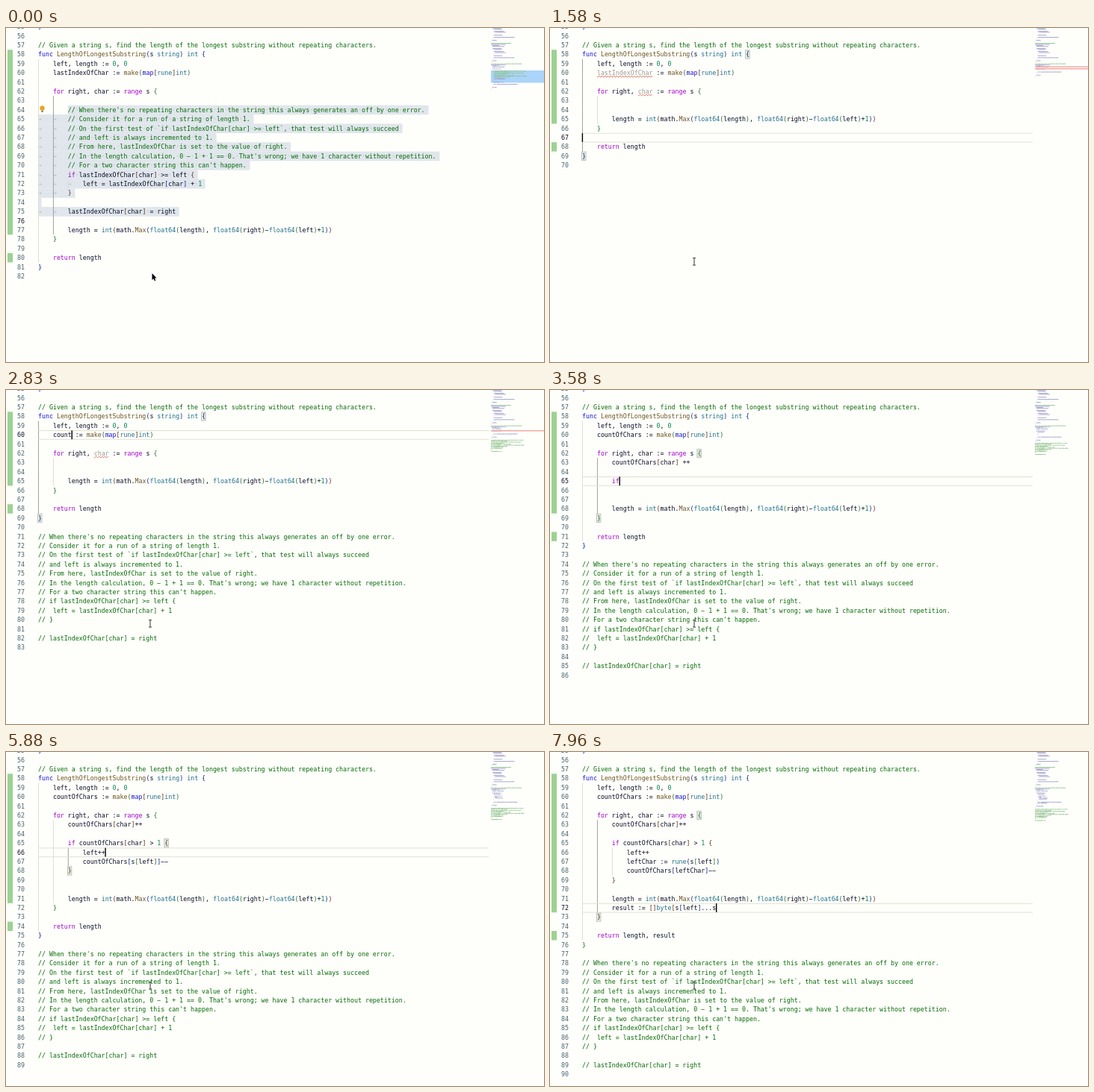
Write an HTML page with a canvas that moves like this. It is 720 px wide and 448 px high and loops after 8000 ms.

```html
<!DOCTYPE html>
<html lang="en">
<head>
<meta charset="utf-8">
<title>Code editor</title>
<style>
  html, body { margin: 0; width: 100%; height: 100%; overflow: hidden; background: #fefefb; }
  canvas { display: block; width: 720px; height: 448px; }
</style>
</head>
<body>
<canvas></canvas>
<script>
const LOOP = 8000, FIRST = 55, PITCH = 12.4, CHAR = 4.98, LEFT = 43;
const canvas = document.querySelector('canvas');
const ctx = canvas.getContext('2d');
const ratio = window.devicePixelRatio || 1;
canvas.width = 720 * ratio;
canvas.height = 448 * ratio;

const START = `}

// Given a string s, find the length of the longest substring without repeating characters.
func LengthOfLongestSubstring(s string) int {
\tleft, length := 0, 0
\tlastIndexOfChar := make(map[rune]int)

\tfor right, char := range s {

\t\t// When there's no repeating characters in the string this always generates an off by one error.
\t\t// Consider it for a run of a string of length 1.
\t\t// On the first test of \`if lastIndexOfChar[char] >= left\`, that test will always succeed
\t\t// and left is always incremented to 1.
\t\t// From here, lastIndexOfChar is set to the value of right.
\t\t// In the length calculation, 0 - 1 + 1 == 0. That's wrong; we have 1 character without repetition.
\t\t// For a two character string this can't happen.
\t\tif lastIndexOfChar[char] >= left {
\t\t\tleft = lastIndexOfChar[char] + 1
\t\t}

\t\tlastIndexOfChar[char] = right

\t\tlength = int(math.Max(float64(length), float64(right)-float64(left)+1))
\t}

\treturn length
}
`.split('\n');

// ---- Editing model: rows are line numbers, columns are character offsets ----
class Editor {
  constructor() {
    this.lines = [...START];
    this.anchor = { row: 64, col: 2 };
    this.row = 76;
    this.col = 0;
    this.focused = false;
    this.clip = '';
  }
  get(row) { return this.lines[row - FIRST] ?? ''; }
  set(row, text) { this.lines[row - FIRST] = text; }
  remove(row) { this.lines.splice(row - FIRST, 1); }
  go(row, col = this.get(row).length) { this.row = row; this.col = col; }
  range() {
    if (!this.anchor) return null;
    const here = { row: this.row, col: this.col };
    return here.row < this.anchor.row ? [here, this.anchor] : [this.anchor, here];
  }
  insert(text) {
    const line = this.get(this.row);
    const parts = (line.slice(0, this.col) + text).split('\n');
    const tail = line.slice(this.col), last = parts.length - 1;
    this.col = parts[last].length;
    parts[last] += tail;
    this.lines.splice(this.row - FIRST, 1, ...parts);
    this.row += last;
  }
  enter() { this.insert('\n' + this.get(this.row).match(/^\t*/)[0]); }
  cut() {
    const [a, b] = this.range();
    const picked = this.lines.slice(a.row - FIRST, b.row - FIRST + 1);
    const joined = this.get(a.row).slice(0, a.col) + this.get(b.row).slice(b.col);
    picked[0] = picked[0].slice(a.col);
    picked[picked.length - 1] = picked.at(-1).slice(0, b.col);
    this.clip = picked.join('\n');
    this.lines.splice(a.row - FIRST, picked.length, joined);
    this.anchor = null;
    this.go(a.row, a.col);
  }
  erase(word) {
    const at = this.get(this.row).indexOf(word);
    this.set(this.row, this.get(this.row).replace(word, ''));
    this.col = at;
  }
  eachRow(from, to, change) {
    for (let r = from; r <= to; r++) this.set(r, change(this.get(r)));
  }
}

// ---- Timeline ----
const steps = [];
const at = (time, action) => steps.push({ time, action });
const type = (t0, t1, text) => [...text].forEach((ch, i) =>
  at(t0 + (t1 - t0) * i / Math.max(1, text.length - 1), e => e.insert(ch)));
const move = (t0, t1, from, to, col) => {
  const count = Math.abs(to - from);
  for (let i = 1; i <= count; i++)
    at(t0 + (t1 - t0) * i / count, e => e.go(from + Math.sign(to - from) * i, col));
};
const enter = (...times) => times.forEach(time => at(time, e => e.enter()));

at(420, e => { e.focused = true; e.anchor = null; e.go(80); });
move(860, 1000, 80, 76, 0);
at(1080, e => { e.anchor = { row: 76, col: 0 }; });
move(1100, 1400, 76, 64, 0);
at(1420, e => e.go(64, 2));
at(1480, e => e.cut());
move(1520, 1620, 64, 70, 0);
enter(1800, 1825, 1850, 1875);
at(1930, e => e.insert(e.clip));
at(1970, e => { e.anchor = { row: 86, col: 0 }; });
move(1980, 2080, 86, 81, 0);
at(2150, e => e.eachRow(81, 85, l => l.replace(/^\t\t\t/, '\t\t ').replace(/^\t\t(?=.)/, '\t\t// ')));
move(2300, 2380, 81, 75, 0);
at(2440, e => { e.eachRow(75, 85, l => l.replace(/^\t\t/, '')); e.anchor = null; e.go(73, 0); });
[73, 72, 71].forEach((row, i) => at(2480 + i * 30, e => { e.remove(row); e.go(row - 1, 0); }));
move(2640, 2720, 70, 60);
at(2740, e => e.erase('lastIndexOfChar'));
type(2760, 2920, 'countOfChars');
at(2980, e => { e.set(63, '\t\t'); e.go(63); });
type(3020, 3340, 'countOfChars[char] ++');
enter(3400, 3470, 3500);
at(3520, e => e.go(65));
type(3540, 3570, 'if');
type(3610, 4200, ' countOfChars[char] > 1 ');
at(4230, e => e.set(63, e.get(63).replace(' ++', '++')));
type(4290, 4290, '{');
at(4330, e => { e.insert('\n\t\t\t\n\t\t}'); e.go(66); });
type(4370, 4560, 'left++');
enter(4600);
type(4650, 4780, 'count');
type(4830, 5250, 'OfChars[s[left]]--');
at(5700, e => e.go(66));
enter(5960);
type(6000, 6280, 'leftChar := rune(s[left])');
at(6320, e => e.go(68));
at(6340, e => e.erase('s[left]'));
type(6360, 6480, 'leftChar');
at(6520, e => { e.remove(70); e.go(70); });
move(6600, 6720, 70, 60);
at(6820, e => e.insert('\n'));
at(7000, e => { e.remove(61); e.go(60); });
move(7030, 7120, 60, 71);
enter(7140);
type(7160, 7340, 'result := ');
at(7370, e => e.go(75));
type(7400, 7580, ', result');
at(7640, e => e.go(72));
type(7660, 7940, '[]byte[s[left]...s');

// ---- Text helpers ----
const COLORS = ['#046a04', '#a000c8', '#1414d8', '#1f7088', '#6b5220', '#098658'];
const BRACKETS = ['#0a2490', '#226a26', '#5c3216'];
const INK = '#080c24';
const TOKEN = /(\/\/.*)|\b(for|range|if|return)\b|\b(func|map)\b|\b(int|string|rune|float64|byte)\b|(\w+(?=\())|\b(\d+)\b|[()[\]{}]|\w+|\S/g;
const expand = text => text.replace(/\t/g, '    ');
const centerY = row => 23 + (row - 57) * PITCH;
const topY = row => centerY(row) - PITCH / 2;
const xAt = (text, col) => LEFT + expand(text.slice(0, col)).length * CHAR;
const rect = (color, x, y, w, h) => { ctx.fillStyle = color; ctx.fillRect(x, y, w, h); };

// Hyphens are drawn as the wider minus sign.
function write(text, x, row, color) {
  ctx.fillStyle = color;
  ctx.fillText(String(text).replace(/-/g, '−'), x, centerY(row) + 2.9);
}

// Blank lines take their depth from the code around them.
function indents(lines) {
  const own = lines.map(l => l.trim() ? l.match(/^\t*/)[0].length : -1);
  return own.map((depth, i) => {
    if (depth >= 0) return depth;
    const above = own.slice(0, i).findLast(d => d >= 0) ?? 0;
    const below = own.slice(i).find(d => d >= 0) ?? 0;
    return above === below ? above : 1 + Math.min(above, below);
  });
}

function unusedNames(lines) {
  const code = lines.filter(l => !l.trim().startsWith('//')).join('\n');
  return ['lastIndexOfChar', 'countOfChars', 'char']
    .filter(name => (code.match(new RegExp(`\\b${name}\\b`, 'g')) || []).length === 1);
}

function squiggle(x, y, width) {
  ctx.beginPath();
  for (let i = 0; i <= width; i++) ctx.lineTo(x + i, y + Math.sin(i * 1.6) * 0.9);
  ctx.strokeStyle = '#d8503c';
  ctx.lineWidth = 0.8;
  ctx.stroke();
}

// ---- Editor parts ----
function drawGutter(e) {
  const end = e.lines.indexOf('\t}') + FIRST;
  const back = e.lines.findIndex(l => l.startsWith('\treturn')) + FIRST;
  rect('#9cd292', 2, topY(58), 7, (end - 58) * PITCH);
  rect('#9cd292', 2, topY(back), 7, PITCH);
  e.lines.forEach((_, i) => {
    const row = FIRST + i;
    write(row, 15, row, row === e.row ? '#0b1028' : '#466470');
  });
}

function drawSelection(e) {
  const range = e.range();
  if (!range) return;
  const [a, b] = range;
  for (let row = a.row; row <= b.row; row++) {
    const text = e.get(row);
    const from = row === a.row ? a.col : 0;
    const to = row === b.row ? b.col : text.length;
    const x = xAt(text, from);
    const width = xAt(text, to) - x + (row < b.row ? 4.5 : 0);
    if (width <= 0) continue;
    rect(e.focused ? '#add6fc' : '#e0e6ec', x, topY(row), width, PITCH + 0.2);
    for (let c = from; c < to; c++) {
      if (text[c] === '\t') write('→', xAt(text, c), row, '#b4bcc0');
      if (text[c] === ' ') write('·', xAt(text, c), row, '#b4bcc0');
    }
  }
}

function drawGuides(e) {
  const depth = indents(e.lines);
  const here = e.row - FIRST, active = depth[here];
  let start = here, end = here;
  while (depth[start - 1] >= active) start--;
  while (depth[end + 1] >= active) end++;
  depth.forEach((levels, i) => {
    for (let level = 0; level < levels; level++) {
      const lit = level === active - 1 && i >= start && i <= end;
      rect(lit ? '#969696' : '#dadad4', LEFT + level * 4 * CHAR, topY(FIRST + i), 0.9, PITCH);
    }
  });
  const opener = e.lines[start - 1] ?? '';
  if (!e.focused || !active || !opener.endsWith('{')) return;
  for (const i of [start - 1, end + 1]) {
    const x = xAt(e.lines[i], e.lines[i].length - 1);
    rect('#e2ece0', x - 0.5, topY(FIRST + i) + 0.5, CHAR + 0.5, PITCH - 1);
    ctx.strokeStyle = '#b4b8b2';
    ctx.lineWidth = 0.8;
    ctx.strokeRect(x - 0.5, topY(FIRST + i) + 0.5, CHAR + 0.5, PITCH - 1);
  }
}

function drawCode(e, unused) {
  let nesting = 0;
  e.lines.forEach((line, i) => {
    const row = FIRST + i, text = expand(line);
    for (const match of text.matchAll(TOKEN)) {
      const word = match[0], x = LEFT + match.index * CHAR;
      const kind = match.slice(1).findIndex(Boolean);
      let color = COLORS[kind] ?? INK;
      if ('([{'.includes(word)) color = BRACKETS[nesting++ % 3];
      if (')]}'.includes(word)) {
        nesting = Math.max(0, nesting - 1);
        color = BRACKETS[nesting % 3];
      }
      if (unused.includes(word)) {
        color = '#9a9a98';
        squiggle(x, centerY(row) + 5, word.length * CHAR);
      }
      write(word, x, row, color);
    }
  });
}

function drawCaret(e) {
  if (!e.focused) return;
  if (!e.anchor) {
    rect('#dedecf', LEFT, topY(e.row), 603, 0.9);
    rect('#dedecf', LEFT, topY(e.row) + PITCH - 0.6, 603, 0.9);
  }
  rect('#000', xAt(e.get(e.row), e.col) - 0.3, topY(e.row) + 0.3, 1.4, PITCH - 0.6);
}

// Indent and length of the code that sits above the visible lines.
const EARLIER = [[2, 62], [1, 1], [0, 0], [1, 13], [0, 1], [0, 0], [0, 60], [0, 44], [1, 20], [1, 36],
  [0, 0], [1, 28], [2, 24], [0, 0], [2, 30], [3, 32], [2, 1], [0, 0], [2, 26], [0, 0]];

function drawMinimap(e, unused) {
  const x0 = 649, step = 1.37, scale = 0.45;
  const y = row => 57 + (row - 64) * step;
  const color = comment => comment ? '#8cc08a' : '#a0a0cc';
  const bar = (comment, col, row, length) =>
    rect(color(comment), x0 + col * scale, y(row) + 0.2, length * scale, 0.9);
  const range = e.range();
  if (range) rect('#aad4fa', x0, y(range[0].row), 71, (range[1].row - range[0].row) * step);
  for (let row = 22; row < FIRST; row++) {
    const [indent, length] = EARLIER[(row - 11) % 20];
    bar(length === 60, indent * 4, row, length);
  }
  e.lines.forEach((line, i) => {
    const row = FIRST + i, comment = line.trim().startsWith('//');
    for (const m of expand(line).matchAll(/\S+/g)) bar(comment, m.index, row, m[0].length);
    if (!comment && unused.some(name => new RegExp(`\\b${name}\\b`).test(line)))
      rect('#f08078', x0, y(row), 71, 1);
  });
}

function drawBulb() {
  ctx.fillStyle = '#e8a81c';
  ctx.beginPath();
  ctx.arc(48.5, 107.5, 3.2, 0, Math.PI * 2);
  ctx.fill();
  rect('#8a7f60', 47.2, 110.6, 2.6, 2.2);
}

function drawMouse(t) {
  const p = Math.min(1, Math.max(0, (t - 80) / 320));
  const ease = p * p * (3 - 2 * p);
  const x = 195.5 - 3 * ease, y = 329 - 16 * ease;
  if (t < 280) {
    const outline = [[0, 0], [0, 9], [2, 7.2], [3.4, 10.2], [4.8, 9.5], [3.4, 6.6], [6, 6.4]];
    ctx.beginPath();
    outline.forEach(([dx, dy]) => ctx.lineTo(x + dx, y + dy));
    ctx.closePath();
    ctx.strokeStyle = '#fff';
    ctx.lineWidth = 1.4;
    ctx.stroke();
    ctx.fillStyle = '#000';
    ctx.fill();
  } else {
    rect('#333', x, y - 4, 1, 9);
    rect('#333', x - 1.5, y - 5, 4, 0.9);
    rect('#333', x - 1.5, y + 4.6, 4, 0.9);
  }
}

function render() {
  const t = performance.now() % LOOP;
  const e = new Editor();
  for (const step of steps) if (step.time <= t) step.action(e);
  const unused = unusedNames(e.lines);

  ctx.setTransform(ratio, 0, 0, ratio, 0, 0);
  ctx.font = '8.27px "DejaVu Sans Mono", monospace';
  rect('#fefefb', 0, 0, 720, 448);
  drawGutter(e);
  drawSelection(e);
  drawGuides(e);
  drawCode(e, unused);
  drawCaret(e);
  if (t < 900) drawBulb();
  drawMinimap(e, unused);
  drawMouse(t);
  requestAnimationFrame(render);
}
render();
</script>
</body>
</html>
```
